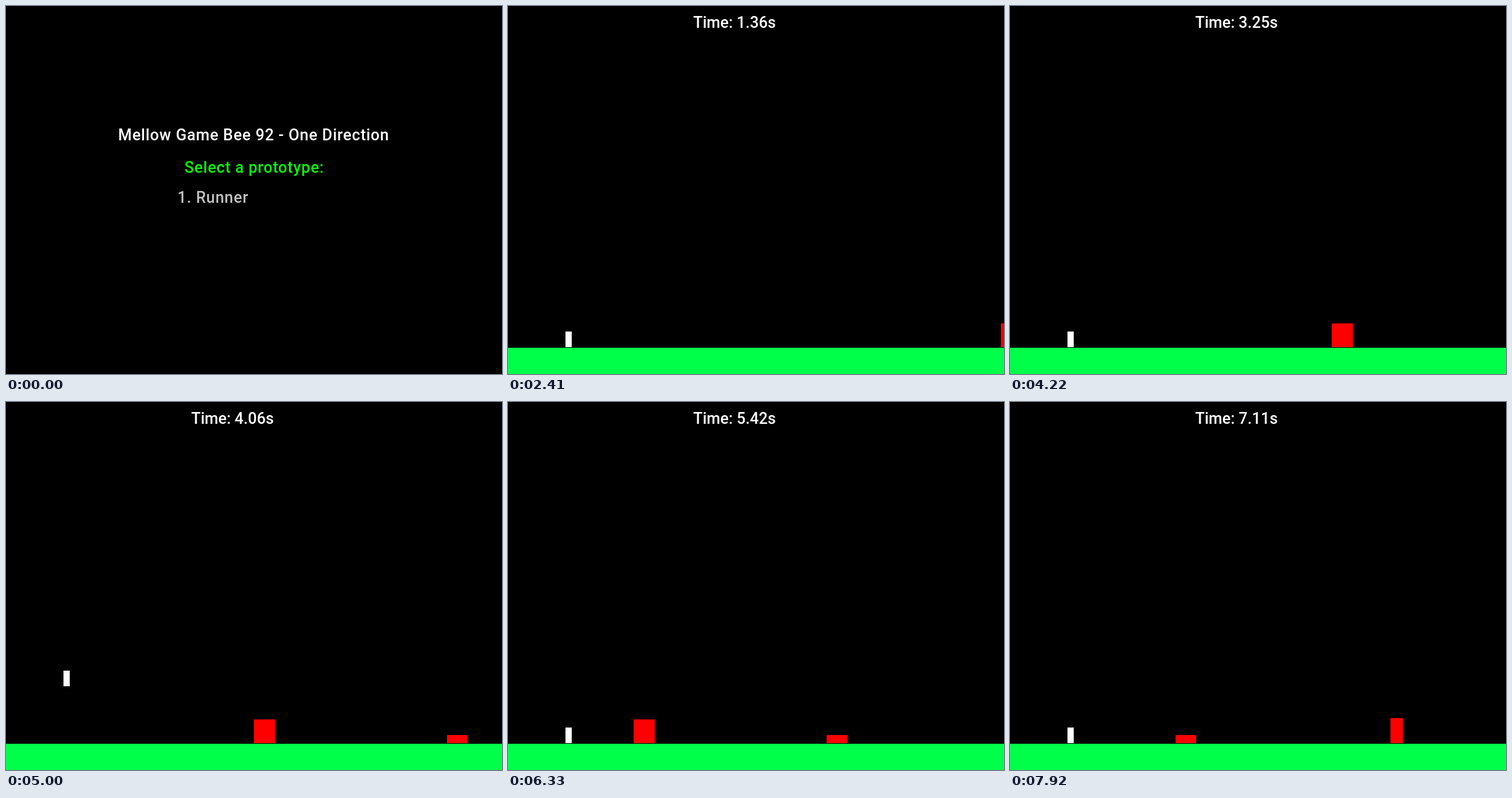
Write an HTML page that moves like this. It is 794x589 px and loops after 8000 ms.

```html
<!DOCTYPE html>
<html lang="en">
<head>
<meta charset="utf-8">
<title>Runner prototype</title>
<style>
  html, body { margin: 0; height: 100%; overflow: hidden; background: #000; }
  svg { display: block; width: 794px; height: 589px; font: 500 25px Roboto, sans-serif; }
  #menu { letter-spacing: .75px; }
</style>
</head>
<body>
<svg viewBox="0 0 794 589">
  <g id="menu">
    <text x="396.5" y="215" text-anchor="middle" fill="#fff">Mellow Game Bee 92 - One Direction</text>
    <text x="397.5" y="267" text-anchor="middle" fill="#0f0">Select a prototype:</text>
    <text x="274.5" y="315" fill="#c0c0c0">1. Runner</text>
  </g>
  <g id="game">
    <text id="clock" x="296.5" y="35" fill="#fff"></text>
    <rect y="547" width="794" height="42" fill="#00ff48"/>
    <g id="blocks" fill="#f00">
      <rect y="508" width="34" height="38"/>
      <rect x="309" y="533" width="33" height="13"/>
      <rect x="653" y="506" width="20" height="40"/>
    </g>
    <rect id="player" x="92" y="521" width="10" height="25" fill="#fff"/>
  </g>
</svg>
<script>
const LOOP = 8000, START = 1118, STEP = 64.4;   // ms; the game redraws once per STEP
const SPEED = 9.8, CLOCK_RATE = 0.0676;         // px and seconds per step
const JUMP_STARTS = [48.1, 83.3], JUMP_STEPS = 17, JUMP_HEIGHT = 108;
const [menu, game, clock, blocks, player] =
  ['menu', 'game', 'clock', 'blocks', 'player'].map(id => document.getElementById(id));

const show = (el, on) => el.style.display = on ? '' : 'none';
const shift = (el, x, y) => el.setAttribute('transform', `translate(${Math.round(x)} ${Math.round(y)})`);

function lift(n) {
  const start = JUMP_STARTS.findLast(s => s <= n) ?? -JUMP_STEPS;
  const u = Math.min(1, (n - start) / JUMP_STEPS);
  return JUMP_HEIGHT * 4 * u * (1 - u);
}

function draw(t) {
  const n = Math.floor((t - START) / STEP), playing = t >= 1130;
  show(menu, !playing);
  show(game, playing);
  clock.textContent = `Time: ${(0.0075 + CLOCK_RATE * n).toFixed(2)}s`;
  shift(blocks, 985.3 - SPEED * n, 0);
  shift(player, 0, -lift(n));
}

let origin;
function frame(now) {
  origin ??= now;
  draw((now - origin) % LOOP);
  requestAnimationFrame(frame);
}
draw(0);
requestAnimationFrame(frame);
</script>
</body>
</html>
```
